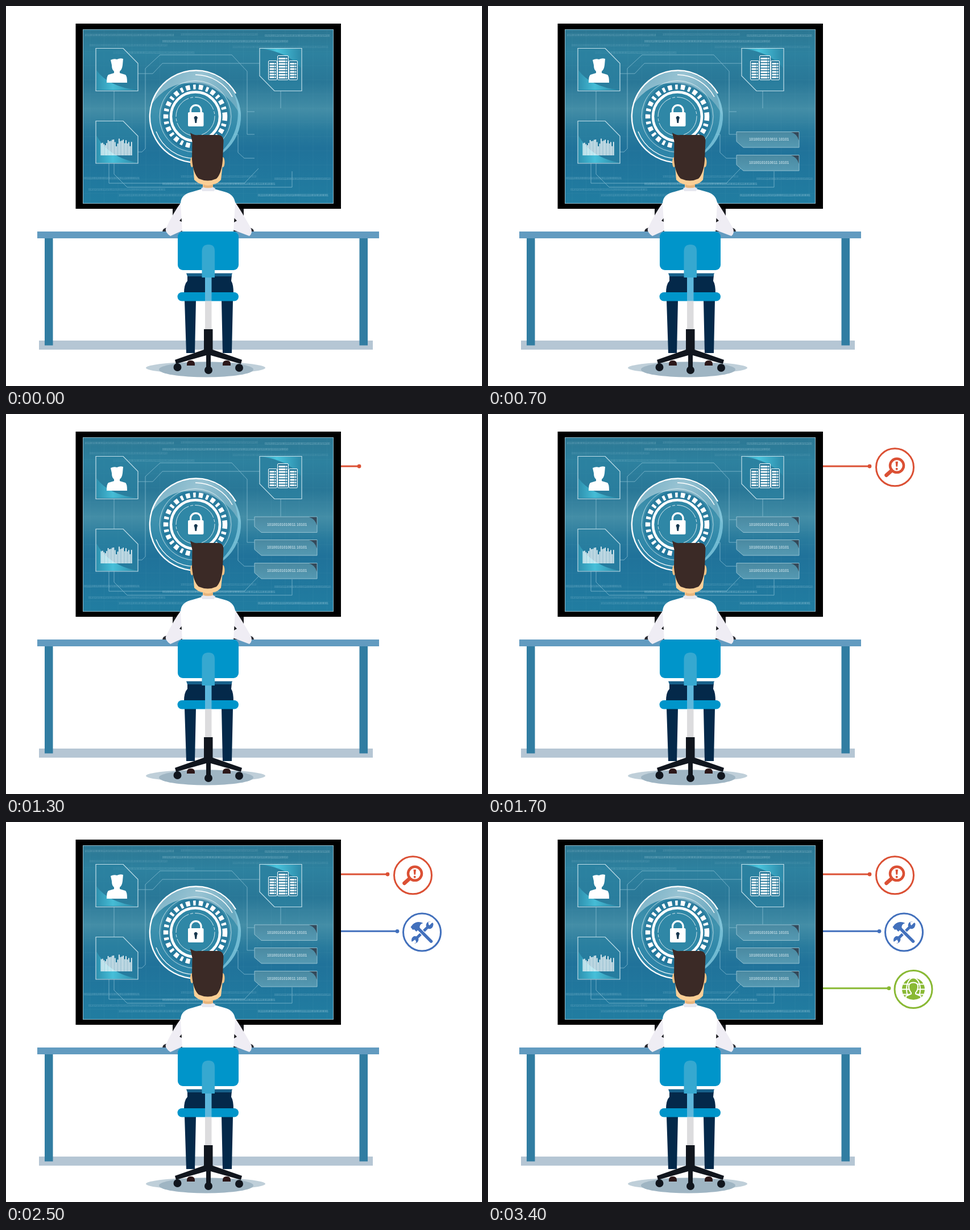
Recreate the animation shown at these times as an HTML page. Size 837x669 px, loop 5.4 s.

```html
<!DOCTYPE html>
<html lang="en">
<head>
<meta charset="utf-8">
<title>Security desk</title>
<style>
  html, body { margin: 0; width: 100%; height: 100%; overflow: hidden; background: #fff; }
  svg { display: block; width: 100%; height: 100%; }
  text { font-family: "Liberation Sans", Arial, sans-serif; }
  .panel { fill: #2a82a2; fill-opacity: .6; stroke: #c3e0ea; stroke-width: 1.2; }
  .wire { fill: none; stroke: #a5d2e2; stroke-width: .9; opacity: .65; }
  .ring { fill: none; stroke: #fff; }
</style>
</head>
<body>
<svg viewBox="0 0 837 669">
  <defs>
    <linearGradient id="screen" x2="0" y2="1">
      <stop offset="0" stop-color="#2c7793"/>
      <stop offset=".14" stop-color="#2d819f"/>
      <stop offset=".3" stop-color="#297797"/>
      <stop offset=".46" stop-color="#438da6"/>
      <stop offset=".58" stop-color="#297b9d"/>
      <stop offset=".68" stop-color="#20729a"/>
      <stop offset="1" stop-color="#217da1"/>
    </linearGradient>
    <linearGradient id="shine">
      <stop offset="0" stop-color="#2f95b3"/>
      <stop offset=".4" stop-color="#4ccbe3"/>
      <stop offset="1" stop-color="#2c8aa9"/>
    </linearGradient>
    <linearGradient id="sheen" x2="1" y2=".4">
      <stop offset="0" stop-color="#fff" stop-opacity=".3"/>
      <stop offset=".5" stop-color="#fff" stop-opacity=".5"/>
      <stop offset="1" stop-color="#fff" stop-opacity=".25"/>
    </linearGradient>
    <linearGradient id="bar" x2="0" y2="1">
      <stop offset="0" stop-color="#4a89a1"/>
      <stop offset="1" stop-color="#5599b2"/>
    </linearGradient>
  </defs>

  <g id="callouts"></g>

  <!-- monitor -->
  <path d="M293 355H418V384H293Z" fill="#17191d"/>
  <path d="M275 397Q275 391 285 390H426Q436 391 436 397Z" fill="#2b2c33"/>
  <rect x="122.500" y="31" width="466.500" height="326"/>
  <rect x="135.500" y="41.500" width="440" height="306" fill="url(#screen)" stroke="#8fb9c9"/>
  <path id="grid" stroke="#88c2d5" stroke-width=".6" opacity=".1"/>
  <g id="binary" fill="#c9e7f0"></g>

  <g class="wire">
    <path d="M232 257H239L245 251V110L271 86H397L424 115V226H437"/>
    <path d="M232 119H258L275 101H446M424 186H437M190 149V202M483 149V180"/>
    <path d="M400 226H408V258L419 268H437M444 286L420 311"/>
    <path d="M181 277V312H420M190 277V296L213 319H503V291"/>
  </g>

  <!-- dial with lock -->
  <circle cx="333" cy="194.500" r="80" fill="#3c9ab8" opacity=".45"/>
  <path d="M256 173A80 80 0 0 1 413 195Q392 148 338 137Q287 129 256 173Z" fill="url(#sheen)"/>
  <path d="M398 148A80 80 0 0 1 360 270A92 92 0 0 0 398 148Z" fill="#86cbe0" opacity=".75"/>
  <g class="ring">
    <path d="M404 154A81 81 0 1 0 333 275.500" stroke-width="2.400"/>
    <path d="M333 121A74 74 0 0 1 398 160" stroke-width="1.400"/>
    <path d="M264 221A74 74 0 0 0 333 268.500" stroke-width="1.200"/>
    <circle cx="333" cy="194.500" r="63" stroke-width="1" opacity=".65"/>
    <circle cx="333" cy="194.500" r="52" stroke="#1a6c92" stroke-width="15" opacity=".5"/>
    <circle cx="333" cy="194.500" r="52" stroke-width="8.500" stroke-dasharray="7.500 5.500 4.500 5.280"/>
    <circle cx="333" cy="194.500" r="43" stroke-width="4.500" fill="#2f87a6"/>
    <circle cx="333" cy="194.500" r="34" stroke-width="1" opacity=".8" stroke-dasharray="42 3 5 3"/>
    <path d="M324.500 189V184A9.300 9.300 0 0 1 343.100 184V189" stroke-width="3.200"/>
  </g>
  <rect x="320" y="187" width="27.500" height="25" rx="2" fill="#fff"/>
  <path d="M331.500 199A3 3 0 1 1 336 199L335 206H332.500Z" fill="#17384f"/>

  <!-- user panel -->
  <path class="panel" d="M158 74.500H206L232 101V149.500H158Z"/>
  <path d="M159 113Q180 142 231 148H159Z" fill="url(#shine)" opacity=".8"/>
  <path d="M184 95Q190 92 195 94Q201 91 206 93L205 104Q204 112 200 115V118L210 121Q213 123 213 135H177Q177 123 180 121L190 118V115Q186 112 186 104Z" fill="#fff"/>

  <!-- chart panel -->
  <path class="panel" d="M158 202.500H206L232 229V277H158Z"/>
  <path d="M159 228Q180 266 231 276H159Z" fill="url(#shine)" opacity=".85"/>
  <path id="chart" stroke="#fff" stroke-width="1.600"/>

  <!-- server panel -->
  <path class="panel" d="M446 74.500H520V149.500H472L446 123Z"/>
  <path d="M447 75Q494 80 519 109V75Z" fill="url(#shine)" opacity=".9"/>
  <g id="servers" fill="#26789a" stroke="#fff"></g>

  <g id="bars"></g>

  <!-- desk -->
  <path d="M58 589H645V605H58Z" fill="#b5c6d4"/>
  <path d="M68 408H82.500V597.500H68ZM621.500 408H636V597.500H621.500Z" fill="#317da2"/>
  <path d="M55 397H656V409H55Z" fill="#629bc0"/>

  <!-- floor shadow and legs -->
  <ellipse cx="351" cy="637" rx="105" ry="10.500" fill="#bfcfd9"/>
  <ellipse cx="352" cy="640" rx="83" ry="13.500" fill="#9fb5c3"/>
  <path d="M318 633Q317 624 325 624T332 633ZM381 633Q380 624 388 624T395 633Z" fill="#2b1719"/>
  <path d="M314 518H334L332 611H317ZM379 518H399L397 611H381Z" fill="#04294a"/>
  <path d="M319 474H397L396 484Q400 490 400 506H313Q313 490 319 484Z" fill="#04294a"/>
  <path d="M317 470.500H398L396 476H319Z" fill="#17608a"/>

  <!-- head -->
  <ellipse cx="327" cy="275" rx="3" ry="9" fill="#f3c286"/>
  <ellipse cx="381.500" cy="275" rx="3" ry="9" fill="#f3c286"/>
  <path d="M328 270H382L378 306Q372 313 364 314V322H346V314Q338 313 331 306Z" fill="#fbcf96"/>
  <path d="M347 314Q355 318 364 314V320H347Z" fill="#e9b57c"/>
  <path d="M324 223Q330 228 338 227H374Q382 228 382.500 237L381 272Q379 295 370 304Q355 311 339 304Q329 295 327 270L327.500 239Z" fill="#3b2a26"/>

  <!-- torso and sleeves -->
  <path d="M309 344Q294 364 281 392Q279 398 289 405L313 394V382L305 378L311 371ZM402 344Q415 363 430 390Q435 399 428 405L399 394V382L406 378L399 371Z" fill="#efedf4"/>
  <path d="M310 398L307 347Q308 331 328 327L345 322H366L384 327Q401 331 403 347L400 398Z" fill="#fff"/>
  <path d="M343 321L347 319Q355 322 364 319L368 321L366 326H345Z" fill="#e6e7ef"/>

  <!-- chair -->
  <rect x="302" y="397" width="107" height="68" rx="9" fill="#0095ca"/>
  <rect x="301.500" y="504" width="107.500" height="15.500" rx="7.700" fill="#0095ca"/>
  <path d="M344.500 478V431Q345 420 356 420T367 431V478Z" fill="#36a8d0"/>
  <path d="M350 478H361.500V519H350Z" fill="#5db7dc"/>
  <path d="M350 519.500H361.500V570H350Z" fill="#dcdcde"/>
  <g fill="#11161e">
    <path d="M348 569H363.500V605L415 623L413 630L360 615V636H352V615L299 630L297 623L348 605Z"/>
    <circle cx="301.500" cy="636" r="7"/>
    <circle cx="410" cy="637" r="7"/>
    <circle cx="356" cy="641" r="7"/>
  </g>
</svg>

<script>
const $ = id => document.getElementById(id);
let seed = 7;
const rand = () => (seed = seed * 16807 % 2147483647) / 2147483647;
const range = n => [...Array(n).keys()];

// Faint grid and rows of digits: x, baseline, width, opacity
$('grid').setAttribute('d',
  range(18).map(i => `M${148 + i * 24.5} 43V346`).join('') +
  range(12).map(i => `M137 ${55 + i * 25}H574`).join(''));
$('binary').innerHTML = [
  [138, 53, 164, .4], [307, 52, 140, .28], [455, 54, 118, .5], [275, 64, 230, .55],
  [147, 71, 140, .25], [398, 74, 174, .2], [188, 84, 150, .3],
  [137, 305, 100, .45], [307, 302, 140, .3], [472, 306, 102, .4], [275, 315, 205, .6],
  [145, 325, 140, .35], [198, 335, 150, .35], [443, 335, 131, .65]
].map(([x, y, w, o]) => {
  const digits = range(Math.floor(w / 2.5)).map(() => rand() < .5 ? 1 : 0).join('');
  return `<text x="${x}" y="${y}" font-size="4.5" opacity="${o}">${digits}</text>`;
}).join('');

$('chart').setAttribute('d',
  range(23).map(i => `M${167.5 + i * 2.42} 263v${-(16 + rand() * 14)}`).join(''));

$('servers').innerHTML = [[461.5, 96.5, 15, 6], [477.5, 87.5, 19, 8], [497.5, 96.5, 15, 6]]
  .map(([x, y, w, n]) => `<rect x="${x}" y="${y}" width="${w}" height="${130 - y}" rx="1.5"/>` +
    range(n).map(i => `<path stroke-width="3" d="M${x + 2} ${y + 5 + i * 4.8}h${w - 7}m1 0h2"/>`).join('')
  ).join('');

const bars = [[262.5, 500], [221.5, 700], [181, 900]];
$('bars').innerHTML = bars.map(([y]) => `<g transform="translate(437 ${y})">
  <path d="M0 0H110V27.5H12L0 17Z" fill="url(#bar)" stroke="#93c0d0"/>
  <path d="M96 .5H109.5V15Q107 4 96 .5Z" fill="#34495a"/>
  <text x="22" y="15.5" font-size="6.5" font-weight="bold" fill="#b9d5df">10100101010011 10101</text>
</g>`).join('');

// Red, blue and green callouts
const magnifier = `
  <circle cx="3.5" cy="-3" r="12" fill="none" stroke-width="4.5"/>
  <path d="M-6 6L-15 14" stroke-width="6.5" stroke-linecap="round"/>
  <path d="M1-10H5.5L4.5 -1H2Z" stroke="none"/><circle cx="3.2" cy="3" r="2" stroke="none"/>`;
const tools = `
  <path d="M-12 13L13 -12" stroke-width="5"/>
  <path d="M18-17L12-11L11-18L16-19Q8-20 7-12Q8-5 15-6Q20-8 20-15ZM-18 17L-12 13L-10 18L-14 20Q-6 19-6 12Q-8 6-14 7Q-20 10-18 17Z" stroke="none"/>
  <path d="M-7-7L17 17" stroke="#fff" stroke-width="8"/>
  <path d="M-6-6L16 16" stroke-width="5.5" stroke-linecap="round"/>
  <path d="M-20-9L-16-14Q-8-21 2-16Q-5-14-4-7L-10-1L-14-5L-16-4Z" stroke="none"/>`;
const globe = `
  <circle r="20" stroke="none"/>
  <g fill="none" stroke="#fff" stroke-width="2"><ellipse rx="12" ry="20"/><path d="M-18-9H18M-20 0H20M-18 9H18"/></g>
  <path d="M0-12Q9-12 8-3Q7 3 4 6V8L13 12V16Q0 23-13 16V12L-4 8V6Q-7 3-8-3Q-9-12 0-12Z" stroke="#fff" stroke-width="2"/>`;

// start: first step; from and end: dot positions; step: distance per 100 ms; show: icon time
const callouts = [
  { color: '#db5034', y: 92, from: 587.7, step: 16.66, end: 671, start: 1100, show: 1700, cx: 715.5, icon: magnifier },
  { color: '#4270bc', y: 192.3, from: 604.5, step: 16.7, end: 688, start: 1900, show: 2500, cx: 731.5, icon: tools },
  { color: '#89b934', y: 292.7, from: 592.5, step: 22.5, end: 705, start: 2700, hold: 3200, show: 3400, cx: 748, icon: globe }
];
$('callouts').innerHTML = callouts.map(c => `<g fill="${c.color}" stroke="${c.color}">
  <path stroke-width="3"/><circle cy="${c.y}" r="3.4" stroke="none"/>
  <g transform="translate(${c.cx} ${c.y + 1.8})">
    <circle r="33" fill="none" stroke-width="3"/>${c.icon}
  </g></g>`).join('');

const show = (el, on) => el.style.display = on ? '' : 'none';

function draw(now) {
  const t = now % 5400;
  bars.forEach(([, at], i) => show($('bars').children[i], t >= at));
  callouts.forEach((c, i) => {
    const group = $('callouts').children[i], [line, dot, icon] = group.children;
    show(group, t >= c.start);
    show(icon, t >= c.show);
    let n = Math.max(0, Math.floor((t - c.start) / 100));
    if (t >= c.hold) n--;
    const x = Math.min(c.end, c.from + n * c.step);
    line.setAttribute('d', `M585 ${c.y}H${x}`);
    dot.setAttribute('cx', x);
  });
  requestAnimationFrame(draw);
}
draw(performance.now());
</script>
</body>
</html>
```
